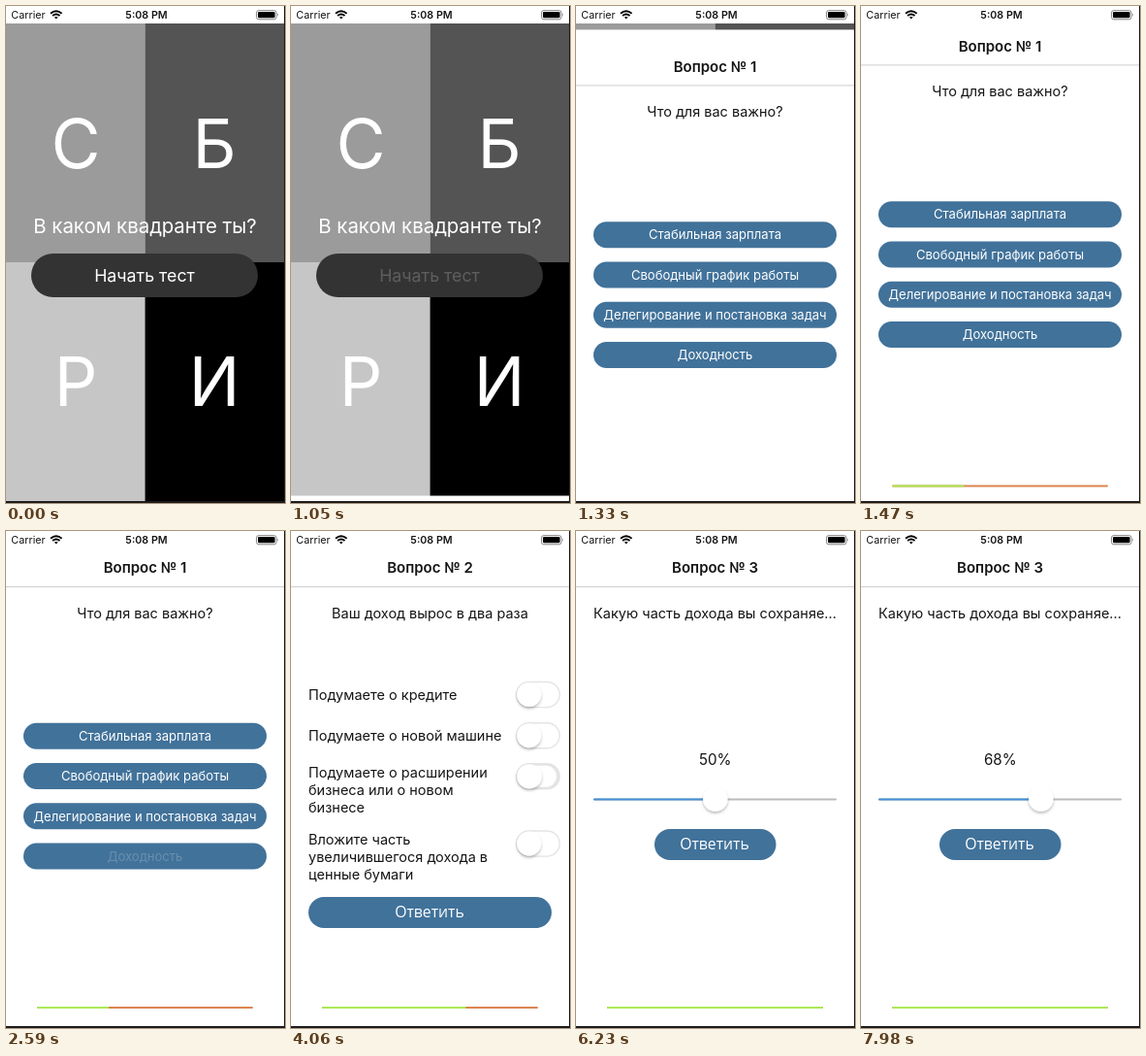
Recreate the animation shown at these times as an HTML page. Size 288 px wide and 512 px high, loop 8 s.

```html
<!DOCTYPE html>
<html lang="ru">
<head>
<meta charset="utf-8">
<title>Quiz</title>
<style>
  html, body { margin: 0; width: 100%; height: 100%; overflow: hidden; background: #fff; }
  svg { display: block; width: 288px; height: 512px; }
  text { font-family: Inter, "Liberation Sans", sans-serif; fill: #151515; }
  .mid { text-anchor: middle; }
  .white { fill: #fff; }
  .body { font-size: 14.5px; }
  .title { font-size: 15px; font-weight: 600; }
  .choice { font-size: 13.1px; }
  .big { font-size: 70px; }
  .answer { font-family: "Open Sans", "Noto Sans", sans-serif; font-size: 15.8px; }
</style>
</head>
<body>
<svg id="stage" viewBox="0 0 288 512" xmlns="http://www.w3.org/2000/svg"></svg>
<script>
const LOOP = 8000;
const BLUE = '#41729a';

const clamp = x => Math.min(1, Math.max(0, x));
const smooth = x => { x = clamp(x); return x * x * (3 - 2 * x); };
const ramp = (t, from, to) => smooth((t - from) / (to - from));
const mix = (a, b, k) => `rgb(${a.map((v, i) => Math.round(v + (b[i] - v) * k))})`;

// Markup helpers
const rect = (x, y, w, h, fill, r = 0, more = '') =>
  `<rect x="${x}" y="${y}" width="${w}" height="${h}" rx="${r}" fill="${fill}" ${more}/>`;
const text = (x, y, cls, str, more = '') =>
  `<text x="${x}" y="${y}" class="${cls}" ${more}>${str}</text>`;
const mid = (x, y, cls, str, more) => text(x, y, 'mid ' + cls, str, more);
const lines = (y, list) => list.map((s, i) => text(18, y + i * 18.3, 'body', s)).join('');
const group = (id, body) => `<g id="${id}">${body}</g>`;

const startScreen = () =>
  rect(0, 0, 288, 18, '#fff') +
  rect(0, 18, 143.5, 246, '#9b9b9b') + rect(143.5, 18, 144.5, 246, '#545454') +
  rect(0, 264, 143.5, 248, '#c6c6c6') + rect(143.5, 264, 144.5, 248, '#000') +
  mid(72, 167, 'big white', 'С') + mid(215, 167, 'big white', 'Б') +
  mid(72, 412, 'big white', 'Р') + mid(215, 412, 'big white', 'И') +
  mid(143.5, 234, 'white', 'В каком квадранте ты?', 'font-size="20.4"') +
  rect(26, 255, 234, 45, '#333', 22.5) +
  mid(143, 284.3, 'white', 'Начать тест', 'id="startLabel" font-size="17.8"');

const choices = () =>
  ['Стабильная зарплата', 'Свободный график работы', 'Делегирование и постановка задач', 'Доходность']
    .map((s, i) => {
      const y = 197.8 + i * 41.25;
      return rect(18, y, 251, 27, BLUE, 13.5) +
        mid(143.5, y + 18.2, 'choice white', s, `id="choice${i}"`);
    }).join('');

const toggle = (id, y) =>
  `<g id="${id}" transform="translate(232 ${y})">` +
  rect(0, 0, 46, 27.5, '#e4e4e4', 13.75, 'class="track"') +
  rect(1.4, 1.4, 43.2, 24.7, '#fff', 12.35, 'class="hole"') +
  rect(1.2, 1.2, 25, 25, '#fff', 12.5, 'class="knob" filter="url(#shadow)"') + '</g>';

const switches = () =>
  lines(173.8, ['Подумаете о кредите']) +
  lines(216, ['Подумаете о новой машине']) +
  lines(253.7, ['Подумаете о расширении', 'бизнеса или о новом', 'бизнесе']) +
  lines(322.7, ['Вложите часть', 'увеличившегося дохода в', 'ценные бумаги']) +
  [154.8, 197, 239, 308.3].map((y, i) => toggle('toggle' + i, y)).join('') +
  rect(18, 377, 251, 32, BLUE, 16) +
  mid(143, 398.3, 'answer white', 'Ответить', 'id="answer"');

const slider = () =>
  mid(143.8, 240.5, '', '', 'id="percent" font-size="15.2"') +
  rect(18, 275.5, 251, 2, '#bababa', 1) +
  rect(18, 275.5, 125, 2, '#428fd6', 1, 'id="filled"') +
  '<circle id="thumb" cy="276" r="12.8" fill="#fff" filter="url(#shadow)"/>' +
  rect(81, 307, 125.5, 32, BLUE, 16) +
  mid(143, 328.3, 'answer white', 'Ответить');

const sheet = () =>
  rect(0, 0, 288, 512, '#fff') +
  rect(0, 57, 288, 1, '#cfcfcf') +
  mid(143.5, 43.2, 'title', '', 'id="title"') +
  mid(143.5, 90, 'body', '', 'id="question"') +
  group('page0', choices()) + group('page1', switches()) + group('page2', slider()) +
  rect(32, 490, 223, 2, '#dc8550', 1) +
  rect(32, 490, 74, 2, '#abe956', 1, 'id="progress"');

const statusBar = () =>
  text(5.3, 13, '', 'Carrier', 'font-size="10.8"') +
  mid(145, 13, '', '5:08 PM', 'font-size="10.7" font-weight="600"') +
  '<g fill="none" stroke="#000" stroke-width="1.8">' +
  '<path d="M46 7.8Q51.8 2.8 57.6 7.8M48.1 10Q51.8 6.9 55.5 10"/></g>' +
  '<path d="M49.9 11.6Q51.8 10.2 53.7 11.6L51.8 13.6Z"/>' +
  rect(258.5, 4.6, 20.6, 9.2, 'none', 2.4, 'stroke="#777" stroke-width=".9"') +
  rect(260, 6.1, 17.6, 6.2, '#000', 1.2) +
  '<path d="M280.2 7.6q1.6 1.6 0 3.2z" fill="#777"/>';

document.getElementById('stage').innerHTML =
  '<defs><filter id="shadow" x="-40%" y="-40%" width="180%" height="190%">' +
  '<feDropShadow dx="0" dy="2" stdDeviation="1.6" flood-opacity=".27"/></filter></defs>' +
  group('start', startScreen()) + group('sheet', sheet()) + statusBar() +
  rect(287, 0, 1, 512, '#1c1c1c') + rect(0, 510, 288, 2, '#1c1c1c');

const $ = id => document.getElementById(id);
const set = (el, attrs) => { for (const k in attrs) el.setAttribute(k, attrs[k]); };

const QUESTIONS = ['Что для вас важно?', 'Ваш доход вырос в два раза', 'Какую часть дохода вы сохраняе...'];

// Critically damped slide from the bottom
function sheetOffset(t) {
  const x = Math.max(0, t - 1040) * 0.0165;
  const y = 512 * (1 + x) * Math.exp(-x);
  return y < 0.4 ? 0 : y;
}

function drawToggle(id, t, at) {
  const press = ramp(t, at - 50, at + 190);
  const slide = ramp(t, at + 140, at + 430);
  const wide = 25 + 5 * press * (1 - ramp(t, at + 250, at + 490));
  const [track, hole, knob] = $(id).children;
  const k = 1 - press;
  track.setAttribute('fill', mix([228, 228, 228], [76, 217, 100], slide));
  set(hole, {
    x: 23 - 21.6 * k, y: 13.75 - 12.35 * k,
    width: 43.2 * k, height: 24.7 * k, rx: 12.35 * k
  });
  set(knob, { x: 1.2 + (43.6 - wide) * slide - 0, width: wide });
}

function draw(t) {
  const page = t < 2800 ? 0 : t < 5880 ? 1 : 2;
  $('sheet').setAttribute('transform', `translate(0 ${sheetOffset(t)})`);
  $('startLabel').setAttribute('opacity', t < 560 ? 1 : 0.2 + 0.8 * ramp(t, 1040, 1250));
  $('title').textContent = 'Вопрос № ' + (page + 1);
  $('question').textContent = QUESTIONS[page];
  for (let i = 0; i < 3; i++) $('page' + i).style.display = i === page ? '' : 'none';

  const done = (1 + ramp(t, 2780, 3150) + ramp(t, 5860, 6230)) / 3;
  $('progress').setAttribute('width', 223 * done);

  $('choice3').setAttribute('opacity', t < 2590 ? 1 : 0.2);
  $('answer').setAttribute('opacity', t < 5740 ? 1 : 0.2);
  drawToggle('toggle2', t, 4060);
  drawToggle('toggle1', t, 4710);

  const value = 0.5 + 0.18 * ramp(t, 7370, 8000);
  const x = 143.8 + (value - 0.5) * 234;
  $('percent').textContent = Math.round(value * 100) + '%';
  $('thumb').setAttribute('cx', x);
  $('filled').setAttribute('width', x - 18);
}

const began = performance.now();
function tick() {
  draw((performance.now() - began) % LOOP);
  requestAnimationFrame(tick);
}
tick();
</script>
</body>
</html>
```
